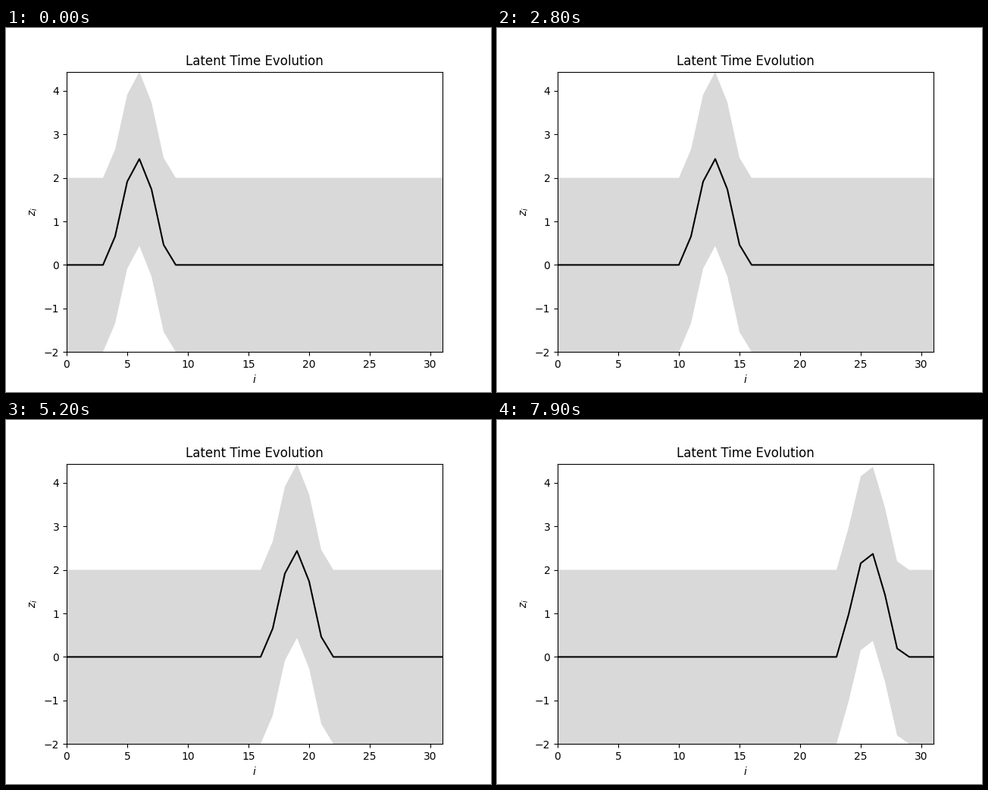
Animation of 640x480 px, one loop 8 s. Source, as a matplotlib script:

```python
import numpy as np
import matplotlib.pyplot as plt
from matplotlib.animation import FuncAnimation

FRAMES, INTERVAL = 80, 100
START, SPEED = 5.92, 0.25     # pulse centre, cells per frame
BASE, GAIN = 1.11, 1.33       # rectified cosine pulse
SPREAD = 2.0                  # half height of the band

cells = np.arange(32)


def latent(frame):
    d = np.clip(cells - START - SPEED * frame, -np.pi, np.pi)
    return np.maximum(0, BASE + GAIN * np.cos(d))


def band(z):
    upper = np.column_stack([cells, z + SPREAD])
    lower = np.column_stack([cells, z - SPREAD])
    return np.vstack([upper, lower[::-1]])


fig, ax = plt.subplots(figsize=(6.4, 4.8), dpi=100)
z0 = latent(0)
fill = ax.fill_between(cells, z0 - SPREAD, z0 + SPREAD,
                       facecolor="black", alpha=0.15, linewidth=0)
line, = ax.plot(cells, z0, color="black", linewidth=1.5)
ax.set_xlim(0, 31)
ax.set_ylim(-SPREAD, BASE + GAIN + SPREAD)
ax.set_title("Latent Time Evolution")
ax.set_xlabel("$i$")
ax.set_ylabel("$z_i$")


def update(frame):
    z = latent(frame)
    line.set_ydata(z)
    fill.set_verts([band(z)])
    return line, fill


anim = FuncAnimation(fig, update, frames=FRAMES, interval=INTERVAL,
                     repeat=True, repeat_delay=0)
plt.show()
```
